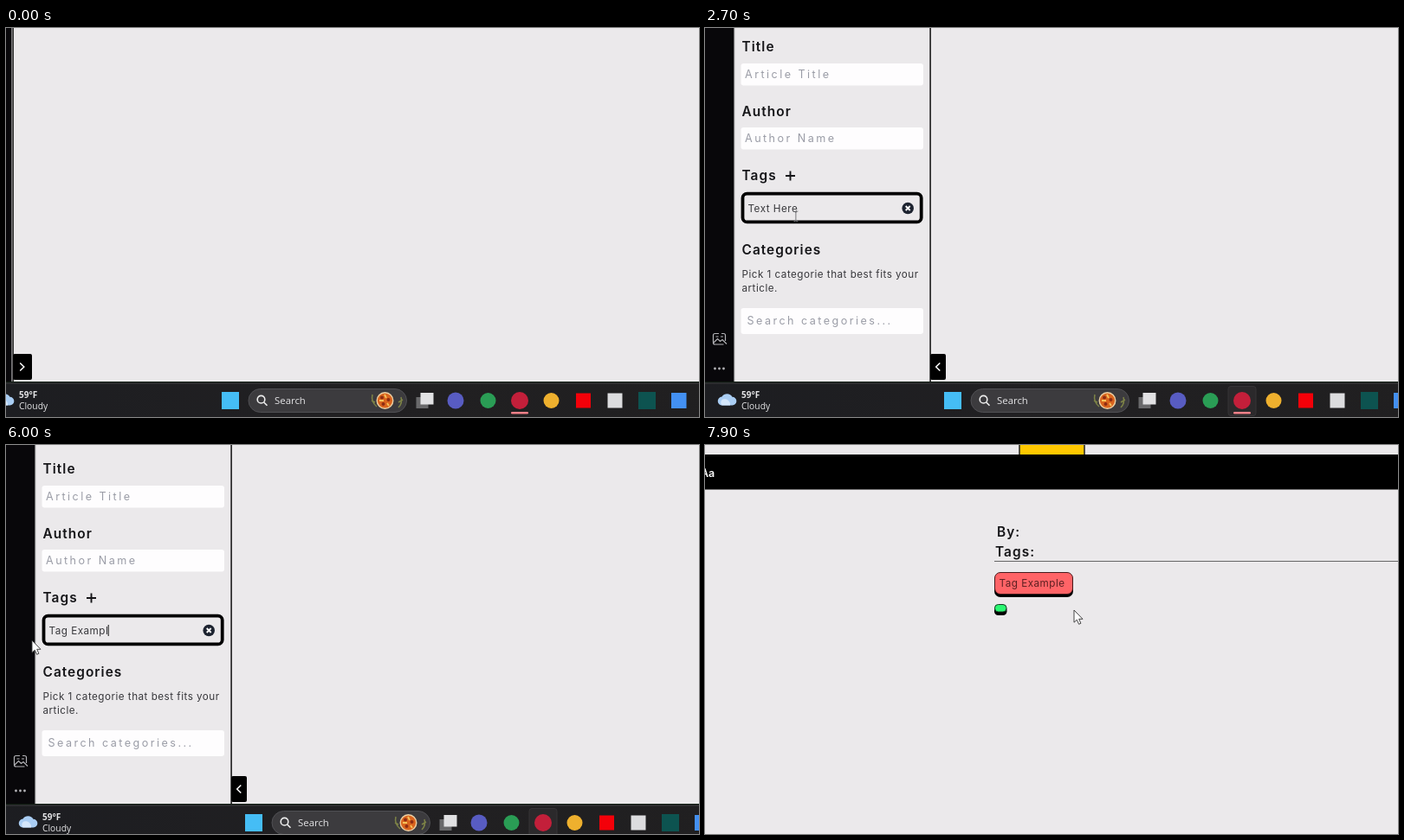
An HTML page that plays this animation: 800x450 px, repeating every 8000 ms.

```html
<!DOCTYPE html>
<html lang="en">
<head>
<meta charset="utf-8">
<style>
  html, body { margin: 0; width: 100%; height: 100%; overflow: hidden; background: #ebe9eb; }
  #stage { display: block; width: 800px; height: 450px; }
  text { font-family: Inter, sans-serif; white-space: pre; }
  .head { font-size: 15.4px; font-weight: 600; letter-spacing: 1.05px; fill: #151518; }
  .hint { font-size: 12.6px; letter-spacing: 2.45px; fill: #9a9ca6; }
  .body { font-size: 11.7px; letter-spacing: .48px; fill: #38383c; }
  .bar text { font-family: "Open Sans", sans-serif; fill: #e4e4e6; }
</style>
</head>
<body>
<svg id="stage" viewBox="0 0 800 450">
  <rect width="800" height="450" fill="#ebe9eb"/>
  <g id="world">
    <!-- article preview -->
    <g transform="translate(330 -356)">
      <rect x="363" y="-40" width="75" height="60" fill="#ffc800" stroke="#222" stroke-width="1.5"/>
      <rect x="-296" y="11" width="1500" height="40.5"/>
      <text x="-5" y="37" font-size="12.5" font-weight="600" fill="#fff">Aa</text>
      <text class="head" x="337" y="106">By:</text>
      <text class="head" x="335" y="128.5">Tags:</text>
      <path d="M334 134.5H1000" stroke="#666"/>
      <rect x="334" y="149" width="91" height="27" rx="7"/>
      <rect x="334.5" y="147.5" width="90" height="25" rx="6.5" fill="#ff6467" stroke="#451a1c"/>
      <text id="chip" class="body" x="339.5" y="164" style="fill:#5c2022"></text>
      <rect x="334" y="186" width="14.5" height="11" rx="4.5"/>
      <rect x="334.5" y="184.5" width="13.5" height="8.5" rx="4" fill="#2bf772" stroke="#143d22"/>
    </g>

    <!-- editor sidebar -->
    <svg id="side" x="33" y="-305" height="714">
      <g transform="translate(-33 305)">
        <rect x="42" y="-160" width="209" height="151" rx="6" fill="none" stroke="#18181b" stroke-width="1.6" stroke-dasharray="5 3.5"/>
        <text class="body" x="104.5" y="-81" style="font-size:12.6px;letter-spacing:2px">Select File</text>
        <text class="head" x="42.5" y="27.3">Title</text>
        <rect x="41.5" y="41" width="210.5" height="25.5" rx="3" fill="#fefdfe"/>
        <text class="hint" x="46" y="57.6">Article Title</text>
        <text class="head" x="42.5" y="101.7">Author</text>
        <rect x="41.5" y="115" width="210.5" height="25.5" rx="3" fill="#fefdfe"/>
        <text class="hint" x="46" y="131.8">Author Name</text>
        <text class="head" x="42.5" y="176">Tags</text>
        <path d="M93 171h11M98.5 165.5v11" stroke="#151518" stroke-width="1.9"/>
        <g id="tag">
          <rect x="43.5" y="191.6" width="206.2" height="32.8" rx="5" fill="#ebe9eb" stroke="#000" stroke-width="3.8"/>
          <rect id="mark" y="200" height="16.5" fill="#2e62d6"/>
          <text id="entry" class="body" x="49.5" y="212.7"></text>
          <path id="caret" stroke="#111"/>
          <circle cx="234.2" cy="208.5" r="6.8" fill="#1d2330"/>
          <path d="M231.7 206l5 5m0-5l-5 5" stroke="#fff" stroke-width="1.8"/>
        </g>
        <g id="cats">
          <text class="head" x="42.5" y="262.4">Categories</text>
          <text class="body" x="42.5" y="288.8">Pick 1 categorie that best fits your</text>
          <text class="body" x="42.5" y="305">article.</text>
          <rect x="41.5" y="324" width="210.5" height="30" rx="3" fill="#fefdfe"/>
          <text class="hint" x="48.5" y="343.4">Search categories...</text>
        </g>
      </g>
    </svg>
    <rect id="edge" y="-305" width="1.4" height="714"/>
    <rect id="tab" y="377" height="30" rx="2"/>
    <path id="arrow" d="M-2.3-4.5L2.3 0L-2.3 4.5" fill="none" stroke="#fff" stroke-width="1.5"/>

    <!-- browser rail -->
    <rect x="-40" y="-600" width="73.5" height="1009" fill="#08070a"/>
    <path d="M33.8-305V409" stroke="#6c6c70" stroke-width=".6"/>
    <g fill="none" stroke="#b4b4b8" stroke-width="1.2">
      <path d="M16 353.5H11.5q-2 0-2 2V364q0 2 2 2H21.5M19 353.5h2.5q2 0 2 2V362"/>
      <path d="M10 364l4.5-4.5 3 3 2.5-2 5 5M12.5 357h3M18 357h3"/>
    </g>
    <g fill="#b4b4b8"><circle cx="11.5" cy="394" r="1.4"/><circle cx="16.5" cy="394" r="1.4"/><circle cx="21.5" cy="394" r="1.4"/></g>

    <!-- taskbar -->
    <g class="bar">
      <linearGradient id="shade"><stop stop-color="#1c1d21"/><stop offset=".3" stop-color="#212022"/><stop offset="1" stop-color="#1f1e1e"/></linearGradient>
      <rect x="-40" y="409" width="1500" height="70" fill="url(#shade)"/>
      <path d="M-40 409.5H1460" stroke="#101c12"/>
      <path d="M-40 411H1460" stroke="#3a3a3d"/>
      <path d="M20 436.5a5 5 0 0 1-.5-10a7 7 0 0 1 12 .3a4.8 4.8 0 0 1 0 9.7z" fill="#a9cdf3"/>
      <path d="M19.500 436.5a4.500 4.500 0 0 1 1-7a6.500 6.500 0 0 1 8.500 7z" fill="#d4e6fa"/>
      <text x="42" y="428" font-size="10" font-weight="700">59°F</text>
      <text x="42" y="441" font-size="10.300">Cloudy</text>
      <rect x="276" y="421" width="20" height="20" fill="#45bdf5"/>
      <rect x="307" y="417.5" width="182.500" height="27" rx="13.500" fill="#3c3b3e" stroke="#505054"/>
      <g fill="none" stroke="#eee" stroke-width="1.6"><circle cx="321.500" cy="429.700" r="4.300"/><path d="M324.700 433l3.800 3.800"/></g>
      <text x="337" y="435" font-size="11.400">Search</text>
      <path d="M450 424q-2 8 5 14M449 431l4 2M480 439q5-5 3-12M485 430l-5 3" fill="none" stroke="#7d8346" stroke-width="1.5"/>
      <circle cx="464.500" cy="431" r="10" fill="#ecd0a4"/>
      <circle cx="464.500" cy="431" r="8.600" fill="#d9641e"/>
      <g fill="#8d2c13"><circle cx="461" cy="427.500" r="2"/><circle cx="468.500" cy="430" r="2"/><circle cx="462.500" cy="435" r="2"/></g>
      <path d="M464 424l2 4M458 431l5 0M467 434l2 3" stroke="#f5c25a" stroke-width="1.8"/>
      <rect x="500.500" y="427" width="14" height="13" fill="#69696b"/>
      <rect x="505.500" y="422" width="15" height="13.500" fill="#e1e1e3"/>
      <circle cx="546" cy="431" r="9.500" fill="#585cc2"/>
      <circle cx="583.500" cy="431" r="9" fill="#2a9d55"/>
      <rect id="lit" x="604" y="414.500" width="32" height="34" rx="3" fill="#2b292b" stroke="#363437"/>
      <circle cx="620" cy="431" r="10" fill="#c31f3a"/>
      <rect x="610" y="444" width="20" height="2.600" rx="1.300" fill="#f58189"/>
      <circle cx="656.500" cy="431" r="9" fill="#eeb02e"/>
      <rect x="685" y="422.500" width="17" height="17" fill="#f40009"/>
      <rect x="721.500" y="422.500" width="17" height="17" fill="#dcdcde"/>
      <rect x="757" y="421" width="20" height="20" fill="#0d5350"/>
      <rect x="795" y="422" width="17.500" height="18" fill="#4390f2"/>
    </g>
  </g>
  <g id="pointer">
    <path id="hand" d="M0 0V14.200L3.300 11.200L5.600 16.300L7.900 15.300L5.700 10.300H10Z" fill="#fff" stroke="#333" stroke-width=".9"/>
    <path id="beam" d="M-2.500-6Q0-6 0-4V4Q0 6-2.500 6M2.500-6Q0-6 0-4M0 4Q0 6 2.500 6" fill="none" stroke="#77777b"/>
  </g>
</svg>
<script>
const $ = id => document.getElementById(id);
const set = (id, attrs) => { for (const k in attrs) $(id).setAttribute(k, attrs[k]); };
const show = (id, on) => { $(id).style.display = on ? '' : 'none'; };
const move = (id, x, y) => set(id, { transform: `translate(${x} ${y})` });

// Keys: time, x, y
const camera = [[0, -27, 0], [500, 0, 0], [2900, 0, 0], [3400, 0, 6], [7300, 0, 6], [7400, -15, 20],
  [7500, -54, 56], [7600, -106.8, 102.5], [7700, -180, 186], [7800, -260, 276], [7900, -330, 356]];
const mouse = [[100, -20, 330], [500, 36, 371], [700, 49, 378], [1100, 49, 378], [1700, 97, 169],
  [2200, 97, 169], [2600, 104.5, 218], [2900, 106, 218], [3600, 30, 226], [6600, 30, 226],
  [7200, 548, 52], [7400, 545, 68], [7600, 528, 106], [7900, 426, 191]];

const clamp = v => Math.min(1, Math.max(0, v));
const smooth = v => v * v * (3 - 2 * v);
function at(keys, t, ease = v => v) {
  let i = 1;
  while (i < keys.length - 1 && t > keys[i][0]) i++;
  const a = keys[i - 1], b = keys[i];
  const k = ease(clamp((t - a[0]) / (b[0] - a[0])));
  return [a[1] + (b[1] - a[1]) * k, a[2] + (b[2] - a[2]) * k];
}

function draw(t) {
  const [mx, my] = at(mouse, t, t < 7200 ? smooth : undefined);
  move('world', ...at(camera, t));

  const open = smooth(clamp((t - 1100) / 400));
  const edge = 35 + 225 * open;
  set('side', { width: edge - 33 });
  set('edge', { x: edge - .6 });
  set('tab', { x: edge, width: 22 - 4 * open });
  set('arrow', { transform: `translate(${edge + 10.5 - 1.5 * open} 392) scale(${open > .5 ? -1 : 1} 1)` });

  const added = t >= 2100;
  show('tag', added);
  show('lit', t >= 1100);
  move('cats', 0, added ? 0 : -44);

  const typed = Math.max(0, Math.min(11, Math.floor((t - 4300) / 170)));
  const value = typed ? 'Tag Example'.slice(0, typed) : 'Text Here';
  $('entry').textContent = $('chip').textContent = value;
  const from = Math.max(49, Math.min(107, mx));
  const picked = t >= 2900 && !typed;
  set('mark', { x: from, width: picked ? 107 - from : 0 });
  $('entry').style.fill = picked && from < 60 ? '#fff' : '';
  show('caret', typed && t < 6800);
  if (typed) set('caret', { d: `M${49.5 + $('entry').getComputedTextLength()} 202v13` });

  const text = t >= 2400 && t < 3700 && mx > 42;
  show('hand', !text);
  show('beam', text);
  move('pointer', mx, my);
}

const start = performance.now();
function tick() {
  const t = (performance.now() - start) % 8000;
  draw(Math.floor(t / 100) * 100);
  requestAnimationFrame(tick);
}
tick();
</script>
</body>
</html>
```
